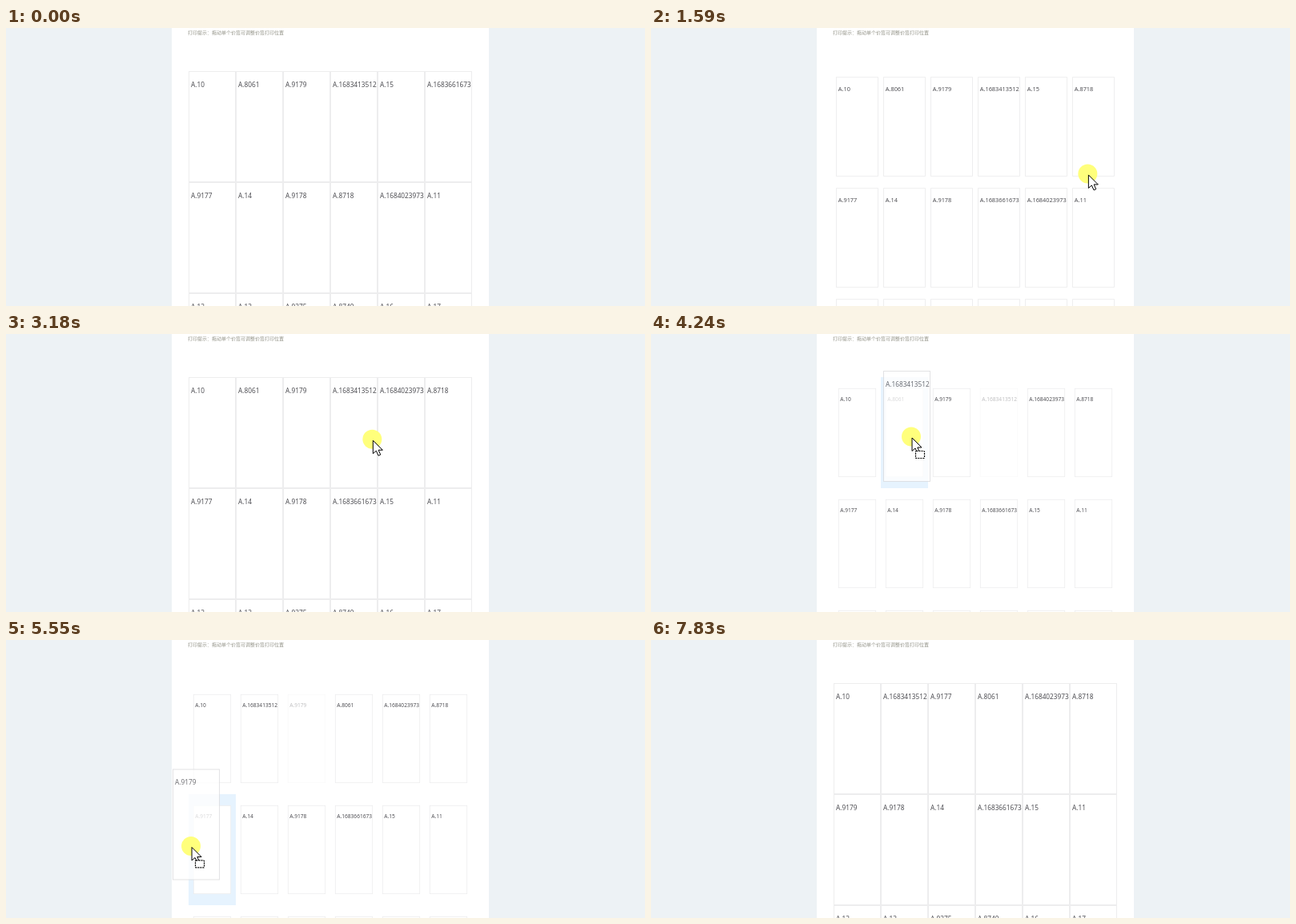
An HTML page for the animation above (7960 ms loop, 798x348 px).

```html
<!DOCTYPE html>
<html lang="zh">
<head>
<meta charset="utf-8">
<style>
  html, body { margin: 0; width: 100%; height: 100%; overflow: hidden; background: #edf2f5; }
  svg { display: block; }
  text { font: 500 8.25px "Noto Sans", "Open Sans", sans-serif; fill: #505055; }
  .hint { font: 6px "Noto Sans CJK SC", "Noto Sans CJK", sans-serif; fill: #95958a; }
  .box { fill: #fff; stroke: #ededee; }
  #ghost .box { stroke: #dcdcde; }
</style>
</head>
<body>
<svg id="stage" width="798" height="348" viewBox="0 0 798 348">
  <rect width="798" height="348" fill="#edf2f5"/>
  <rect x="207" width="396" height="348" fill="#fff"/>
  <text class="hint" x="227" y="8.2">打印提示：拖动单个价签可调整价签打印位置</text>
  <rect id="target" width="59" height="139" fill="#e6f3fe"/>
  <g id="grid"></g>
  <g id="ghost" opacity=".8"></g>
  <g id="cursor">
    <circle cx="-1" cy="-1.5" r="12" fill="#ffff7c"/>
    <path d="M0 0V16.5L4 13L6.7 19L9.4 17.8L6.8 12H12Z" fill="#fff" stroke="#000"/>
    <rect id="dragMark" x="4.5" y="16.5" width="11" height="9" rx="1" fill="#fff" stroke="#000" stroke-width="1.2" stroke-dasharray="2 1"/>
  </g>
</svg>
<script>
const LOOP = 7960, COLS = 6, W = 59, H = 139, LEFT = 228, TOP = 54;
const FADE = 600;    // card scaling time, ms
const REACH = .83;   // share of a drag spent moving, the rest is hovering
const ENTER = 190, LEAVE = 7620;

const labels = ('10 8061 9179 1683413512 15 1683661673 ' +
  '9177 14 9178 8718 1684023973 11 ' +
  '12 13 9375 8749 16 17').split(' ').map(s => 'A.' + s);

const $ = id => document.getElementById(id);
const clamp = v => Math.min(1, Math.max(0, v));
const smooth = u => u * u * (3 - 2 * u);
const easeOut = u => 1 - (1 - u) ** 2;
const mix = (a, b, u) => a.map((v, i) => v + (b[i] - v) * u);
const place = (el, x, y) => el.setAttribute('transform', `translate(${x} ${y})`);
const show = (el, on) => el.setAttribute('visibility', on ? 'visible' : 'hidden');
const slotPos = i => [LEFT + i % COLS * W, TOP + Math.floor(i / COLS) * H];

// grab: pointer offset inside the card, aim: where the pointer lets go
function drag(start, drop, from, to, grab, aim) {
  const home = slotPos(from).map((v, i) => v + grab[i]);
  return { start, drop, from, to, grab, home, aim };
}

const drags = [
  drag(720, 1420, 9, 5, [33, 32], [566, 167]),
  drag(1920, 2480, 10, 4, [29.5, 36.5], [496, 123]),
  drag(3600, 4370, 3, 1, [36, 84], [326, 130]),
  drag(4930, 5690, 2, 6, [24, 98], [232, 259.5]),
  drag(6465, 7150, 8, 7, [24, 73], [320, 263])
];

// CSS "ease" curve
function ease(p) {
  const bez = (a, b, u) => 3 * a * u * (1 - u) ** 2 + 3 * b * u * u * (1 - u) + u ** 3;
  let lo = 0, hi = 1;
  for (let i = 0; i < 24; i++) {
    const mid = (lo + hi) / 2;
    if (bez(.25, .25, mid) < p) lo = mid; else hi = mid;
  }
  return bez(.1, 1, lo);
}

function pointer(t) {
  const i = drags.findIndex(d => t < d.drop);
  const next = drags[i] || { start: LEAVE, home: [556, 375] };
  if (t >= next.start && next.aim) {
    const u = clamp((t - next.start) / (next.drop - next.start) / REACH);
    return mix(next.home, next.aim, easeOut(u));
  }
  const prev = drags.filter(d => t >= d.drop).pop() || { drop: ENTER, aim: [430, 372] };
  return mix(prev.aim, next.home, smooth(clamp((t - prev.drop) / (next.start - prev.drop))));
}

function scaleAt(t) {
  const d = drags.filter(d => t >= d.start).pop();
  if (!d) return 1;
  const shrink = .2 * ease(clamp((Math.min(t, d.drop) - d.start) / FADE));
  return 1 - shrink * (1 - ease(clamp((t - d.drop) / FADE)));
}

function addCard(parent) {
  const g = document.createElementNS('http://www.w3.org/2000/svg', 'g');
  g.innerHTML = `<rect class="box" x=".5" y=".5" width="${W - 1}" height="${H - 1}"/><text x="3" y="20"></text>`;
  parent.append(g);
  return { g, text: g.lastChild };
}

const cards = labels.map(() => addCard($('grid')));
const ghost = addCard($('ghost'));

function draw(t) {
  const order = labels.slice();
  for (const { drop, from, to } of drags) {
    if (t >= drop) [order[from], order[to]] = [order[to], order[from]];
  }
  const active = drags.find(d => t >= d.start && t < d.drop);
  const k = scaleAt(t);
  const [px, py] = pointer(t);

  cards.forEach(({ g, text }, i) => {
    const [x, y] = slotPos(i);
    g.setAttribute('transform',
      `translate(${x + W / 2 * (1 - k)} ${y + H / 2 * (1 - k)}) scale(${k})`);
    g.setAttribute('opacity', active && active.from === i ? .35 : 1);
    text.textContent = order[i];
  });

  place($('cursor'), px, py);
  show($('cursor'), t >= ENTER);
  show($('dragMark'), active);
  show($('ghost'), active);

  let over = -1;
  if (active) {
    over = Math.floor((px - LEFT) / W) + COLS * Math.floor((py - TOP) / H);
    place(ghost.g, px - active.grab[0], py - active.grab[1]);
    ghost.text.textContent = order[active.from];
    place($('target'), ...slotPos(over));
  }
  show($('target'), active && over !== active.from);
}

const begin = performance.now();
function tick() {
  draw((performance.now() - begin) % LOOP);
  requestAnimationFrame(tick);
}
tick();
</script>
</body>
</html>
```
